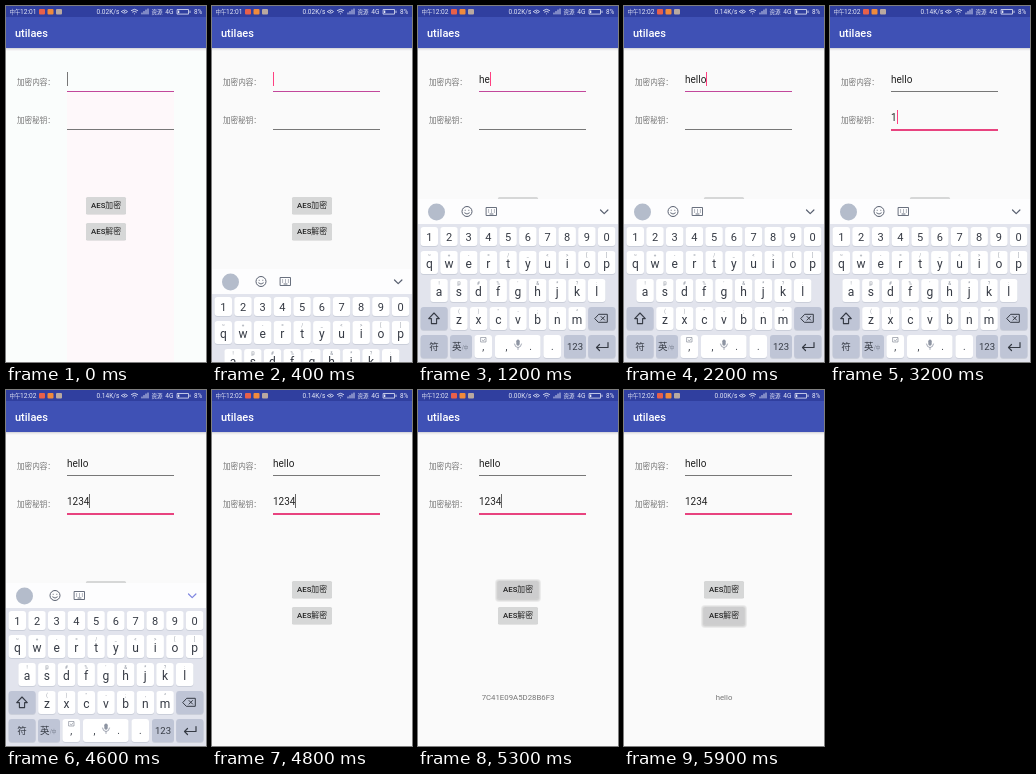
An HTML page that plays this animation: 200x356 px, repeating every 6000 ms.

```html
<!DOCTYPE html>
<html lang="zh">
<head>
<meta charset="utf-8">
<title>utilaes</title>
<style>
html, body { margin: 0; width: 100%; height: 100%; overflow: hidden; background: #fafafa; }
svg { display: block; width: 200px; height: 356px; }
text { font-family: Roboto, "Noto Sans CJK SC", "Noto Sans CJK", sans-serif; white-space: pre; }
</style>
</head>
<body>
<svg id="stage" viewBox="0 0 200 356"></svg>
<script>
const NS = 'http://www.w3.org/2000/svg';
const LOOP = 6000, TICK = 100;
const PINK = '#ff4081', GREY = '#777';
const stage = document.getElementById('stage');

function add(parent, tag, attrs, content) {
  const el = document.createElementNS(NS, tag);
  for (const k in attrs) el.setAttribute(k, attrs[k]);
  if (content !== undefined) el.textContent = content;
  parent.appendChild(el);
  return el;
}
const rect = (p, x, y, width, height, fill, rx = 0) => add(p, 'rect', { x, y, width, height, fill, rx });
const label = (p, x, y, size, fill, str, anchor = 'start', weight = 400) =>
  add(p, 'text', { x, y, 'font-size': size, fill, 'text-anchor': anchor, 'font-weight': weight }, str);
const stroke = (p, d, color, width = 1) =>
  add(p, 'path', { d, fill: 'none', stroke: color, 'stroke-width': width, 'stroke-linecap': 'round', 'stroke-linejoin': 'round' });
const show = (el, on) => el.setAttribute('visibility', on ? 'visible' : 'hidden');

// Page
const tint = add(stage, 'g', {});
rect(tint, 0, 42, 200, 314, '#fafdfc');
rect(tint, 61, 86, 107, 270, '#fef8fa');
['#d9d9dd', '#ebebed', '#f5f5f6'].forEach((c, i) => rect(stage, 0, 42 + i, 200, 1, c));
rect(stage, 0, 0, 200, 42, '#3f51b5');
rect(stage, 0, 0, 200, 11, '#303f9f');
label(stage, 9, 31, 11, '#fff', 'utilaes', 'start', 500);

// Status bar
const INK = '#e4e7f6';
label(stage, 3.5, 8, 5.4, INK, '中午');
const clock = label(stage, 30.5, 8.2, 6.6, INK, '', 'end');
rect(stage, 33, 3, 6, 5.5, '#e8604a', 1);
rect(stage, 41.5, 3, 6, 5.5, '#f08a3c', 1);
rect(stage, 50, 3, 6, 5.5, '#b9a9a0', 1);
const speed = label(stage, 90.5, 8.1, 6.5, INK, '');
stroke(stage, 'M115.5 5.6Q118.5 2.5 121.5 5.6Q118.5 8.7 115.5 5.6M118.5 5.4v.4', INK, 0.8);
stroke(stage, 'M125.4 4.4Q128.5 2 131.6 4.4M126.6 6Q128.5 4.5 130.4 6M128.5 7.8v.1', INK, 0.9);
stroke(stage, 'M136 8v-1M138 8v-2.5M140 8v-4M142 8v-5', INK, 0.9);
label(stage, 145.5, 8, 5.6, INK, '资源');
label(stage, 159.2, 8.1, 6.6, INK, '4G');
stroke(stage, 'M171.5 3.5h11v4.6h-11zM184 5v1.6', INK, 0.8);
rect(stage, 172, 4.5, 1.3, 2.6, INK);
label(stage, 188, 8.1, 6.4, INK, '8%');

// Form
label(stage, 11, 78.8, 7.6, '#757575', '加密内容：');
label(stage, 11, 116.8, 7.6, '#757575', '加密秘钥：');
function field(base, focusColor, thickness) {
  const text = label(stage, 61, base, 10, '#222', '');
  const line = rect(stage, 61, base + 8, 107, 1, GREY);
  const caret = rect(stage, 61, base - 11, 1, 14, PINK);
  return (str, focused, caretColor) => {
    text.textContent = str;
    line.setAttribute('fill', focused ? focusColor : GREY);
    line.setAttribute('height', focused ? thickness : 1);
    caret.setAttribute('x', 61 + (str ? Math.round(text.getComputedTextLength()) : 0));
    caret.setAttribute('fill', caretColor || PINK);
    show(caret, focused && caretColor);
  };
}
const content = field(77, '#c2479b', 1);
const secret = field(115, '#e8437f', 2);

function button(y, latin, han) {
  const glow = add(stage, 'g', {});
  for (let i = 3; i > 0; i--) {
    add(glow, 'rect', { x: 80 - i, y: y - i + 1, width: 40 + 2 * i, height: 17 + 2 * i, rx: 1 + i, fill: '#000', opacity: 0.06 });
  }
  rect(stage, 80, y + 0.5, 40, 17, '#cdcdcd', 1.6);
  const face = rect(stage, 80, y, 40, 17, '#d6d7d7', 1.6);
  const text = label(stage, 100, y + 11.4, 7.8, '#222', '', 'middle');
  add(text, 'tspan', { 'font-weight': 500 }, latin);
  add(text, 'tspan', {}, han);
  return pressed => {
    show(glow, pressed);
    face.setAttribute('fill', pressed ? '#cdcdce' : '#d6d7d7');
  };
}
const encrypt = button(191, 'AES', '加密');
const decrypt = button(217, 'AES', '解密');
const result = label(stage, 100, 309.5, 7.8, '#757575', '', 'middle');

// Keyboard
const board = add(stage, 'g', {});
rect(board, 0, 193, 200, 163, '#e2e4ed');
rect(board, 0, 193, 200, 25, '#fdfdfe');
add(board, 'circle', { cx: 18.5, cy: 206, r: 8.5, fill: '#b4bccb' });
const ICON = '#596070';
add(board, 'circle', { cx: 49, cy: 205.5, r: 5, fill: 'none', stroke: ICON });
stroke(board, 'M47.2 204.2v.2M50.8 204.2v.2M46.6 207Q49 209.4 51.4 207', ICON, 0.9);
stroke(board, 'M68.5 201.5h10v8h-10zM70.5 204h.2M73.4 204h.2M76.3 204h.2M70.5 206h.2M73.4 206h.2M76.3 206h.2M72 208h3', ICON, 0.9);
const chevron = stroke(board, 'M182.5 204l3.7 3.7 3.7-3.7', ICON, 1.2);

function key(x, y, w, h, dark) {
  rect(board, x, y + 1, w, h, '#cbcfda', 3);
  rect(board, x, y, w, h, dark ? '#bfc5d6' : '#fff', 3);
}
function row(chars, hints, x, y, h, size, base) {
  [...chars].forEach((c, i) => {
    const left = x + i * 19.7;
    key(left, y, 17.4, h);
    label(board, left + 8.7, base, size, '#353a44', c, 'middle');
    if (hints) label(board, left + 8.7, y + 6, 4.5, '#8a909c', hints[i], 'middle');
  });
}
row('1234567890', '', 2.6, 221, 19, 11, 234.5);
row('qwertyuiop', '~+-=/_<>[]', 2.6, 245, 23, 12, 262);
row('asdfghjkl', '!@#%\'&*?:', 12.4, 273, 23, 12, 290);
row('zxcvbnm', '()"-;,^', 32.2, 301, 23, 12, 318);
key(2.6, 301, 27, 23, true);
key(170.2, 301, 27.3, 23, true);
stroke(board, 'M16 307l5.3 5.6h-2.7v5h-5.2v-5h-2.7z', '#353a44', 1.1);
stroke(board, 'M177 312.3l3.7-4h8.6v8h-8.6zM183 310.5l3.6 3.6M186.6 310.5l-3.6 3.6', '#353a44', 1);

[[2.6, 27, 1], [32, 22, 1], [56.5, 17.5], [77, 45.5], [125.5, 17.5], [146, 22, 1], [170.2, 27.3, 1]]
  .forEach(([x, w, dark]) => key(x, 329, w, 23, dark));
label(board, 16, 344.3, 9.5, '#353a44', '符', 'middle');
label(board, 34, 344.2, 9.5, '#353a44', '英');
label(board, 44, 343, 4.5, '#6c7382', '/中');
stroke(board, 'M63 331.5h5v4.5h-5zM64.2 334l1.2 1 1.6-2', '#777e8c', 0.6);
label(board, 65.3, 344, 10, '#353a44', ',', 'middle');
label(board, 88.5, 344, 10, '#353a44', ',', 'middle');
label(board, 112.5, 344, 10, '#353a44', '.', 'middle');
rect(board, 98.3, 333.5, 3.4, 6.3, '#8d94a2', 1.7);
stroke(board, 'M96.5 338Q97 341.5 100 341.5T103.5 338M100 341.5v2', '#8d94a2', 0.8);
label(board, 134.3, 344, 10, '#353a44', '.', 'middle');
label(board, 157, 344, 9.5, '#353a44', '123', 'middle');
stroke(board, 'M190 336.5v5h-11.5M181.5 338.5l-3 3 3 3', '#353a44', 1.2);

// Timeline: [start ms, value]
const STEPS = {
  clock: [[0, '12:01'], [500, '12:02']],
  speed: [[0, '0.02K/s'], [1700, '0.14K/s'], [5200, '0.00K/s']],
  content: [[0, ''], [1000, 'h'], [1200, 'he'], [1500, 'hel'], [1800, 'hell'], [2100, 'hello']],
  secret: [[0, ''], [3100, '1'], [3500, '12'], [3900, '123'], [4200, '1234']],
  caret: [[0, GREY], [400, PINK], [4300, '#666'], [5700, '']],
  board: [[0, 163], [400, 70], [500, 0], [4700, 90], [4800, 163]],
  result: [[0, ''], [5300, '7C41E09A5D28B6F3'], [5900, 'hello']]
};
const at = (name, t) => STEPS[name].filter(s => s[0] <= t).pop()[1];
const within = (t, a, b) => t >= a && t < b;

function draw(t) {
  const second = t >= 2700;
  const caret = at('caret', t);
  clock.textContent = at('clock', t);
  speed.textContent = at('speed', t);
  content(at('content', t), !second, caret);
  secret(at('secret', t), second, caret);
  show(tint, t < 100);
  board.setAttribute('transform', `translate(0 ${at('board', t)})`);
  chevron.setAttribute('stroke', within(t, 4500, 4800) ? '#7f86e0' : ICON);
  encrypt(within(t, 5200, 5400));
  decrypt(t >= 5900);
  result.textContent = at('result', t);
}

const start = performance.now();
let last = -1;
function loop() {
  const t = Math.floor(((performance.now() - start) % LOOP) / TICK) * TICK;
  if (t !== last) draw(last = t);
  requestAnimationFrame(loop);
}
loop();
</script>
</body>
</html>
```
